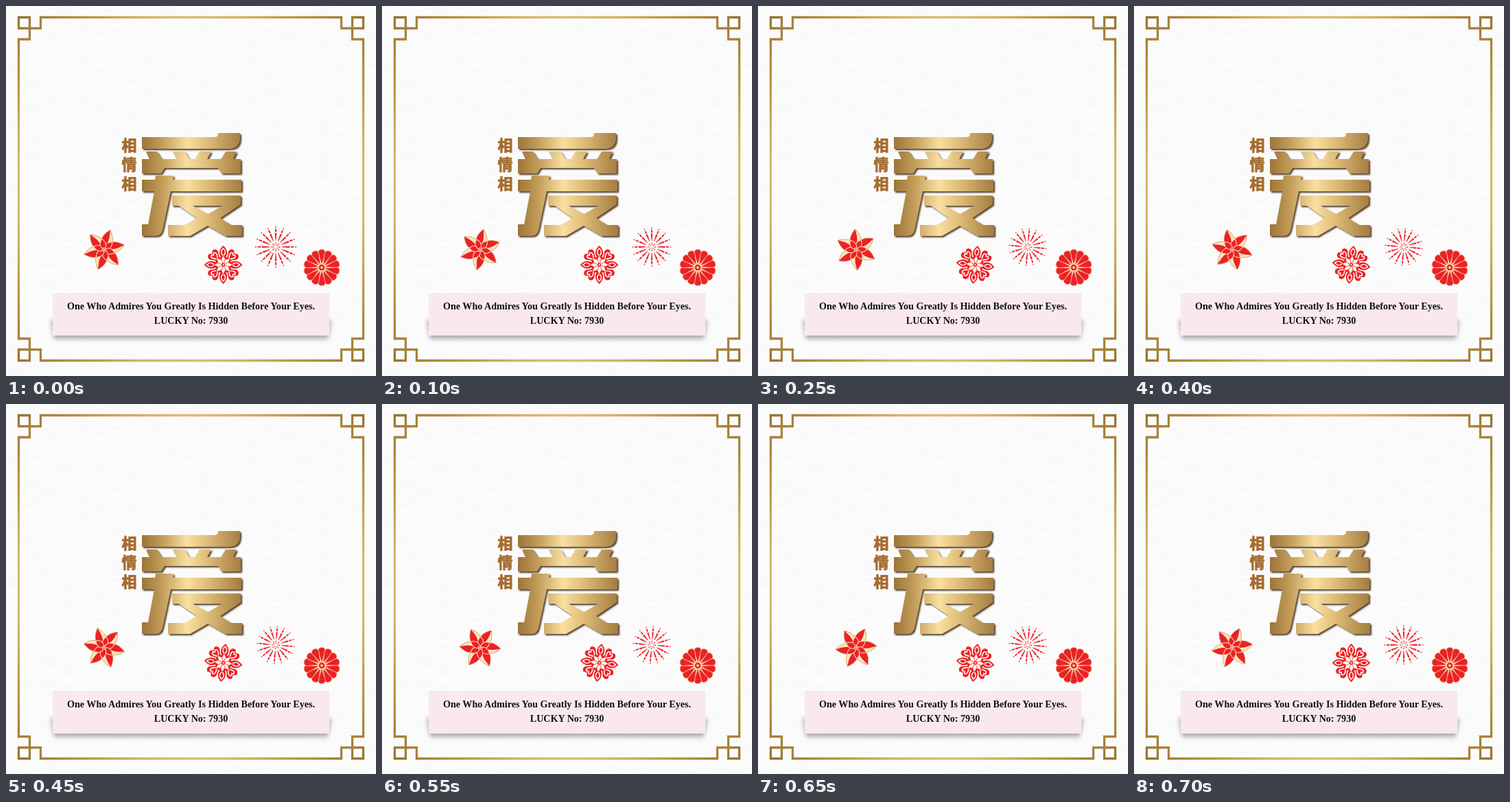
Animation of 539x539 px, one loop 750 ms. Source, as an HTML page:

```html
<!DOCTYPE html>
<html lang="en">
<head>
<meta charset="utf-8">
<style>
html, body { margin: 0; width: 100%; height: 100%; overflow: hidden; background: #fbfbfb; }
svg { display: block; width: 100vw; height: 100vh; }
.message { font: bold 14.1px "Liberation Serif", "Times New Roman", serif; text-anchor: middle; fill: #111; }
.side { font: 900 22px "Noto Sans CJK SC", "Noto Sans CJK", sans-serif; text-anchor: middle;
  fill: #a56d32; stroke: #a56d32; stroke-width: .8; stroke-linejoin: round; }
</style>
</head>
<body>
<svg viewBox="0 0 539 539">
  <defs>
    <linearGradient id="gold" gradientUnits="userSpaceOnUse" x1="198" x2="344">
      <stop offset="0" stop-color="#9d753a"/>
      <stop offset=".2" stop-color="#c29c58"/>
      <stop offset=".45" stop-color="#f9dfa0"/>
      <stop offset=".65" stop-color="#dfbd78"/>
      <stop offset="1" stop-color="#a27b40"/>
    </linearGradient>
    <radialGradient id="trim" gradientUnits="userSpaceOnUse" cx="269.5" cy="266.5" r="356">
      <stop offset=".7" stop-color="#dcbb70"/>
      <stop offset=".8" stop-color="#c09a4c"/>
      <stop offset="1" stop-color="#98722e"/>
    </radialGradient>
    <filter id="paper" x="0" y="0" width="1" height="1">
      <feTurbulence type="fractalNoise" baseFrequency=".04 .2" numOctaves="3" seed="4"/>
      <feColorMatrix values="0 0 0 0 .86  0 0 0 0 .86  0 0 0 0 .87  .5 0 0 0 -.15"/>
    </filter>
    <filter id="soft" x="-.1" y="-.5" width="1.2" height="2"><feGaussianBlur stdDeviation="3"/></filter>
    <filter id="lift" x="-.1" y="-.1" width="1.2" height="1.2">
      <feDropShadow dx="2" dy="2" stdDeviation=".8" flood-color="#46301a" flood-opacity=".95"/>
    </filter>
  </defs>

  <rect width="539" height="539" fill="#fcfcfc"/>
  <rect width="539" height="539" filter="url(#paper)"/>
  <path id="frame" fill="none" stroke="url(#trim)" stroke-width="3.3"/>

  <g class="side">
    <text x="179.5" y="211">相</text>
    <text x="179.5" y="239">情</text>
    <text x="179.5" y="267">相</text>
  </g>

  <g fill="url(#gold)" fill-rule="evenodd" filter="url(#lift)">
    <path d="M198 191H304Q309 191 309 185H341V192Q341 208 325 208H198Z"/>
    <path d="M198 223H209L204 212H220L227 223H249L243 212H260L267 223H275L282 212H299L293 223H313L320 212H336L331 223H342V244H314L309 236H231L226 244H198Z"/>
    <path d="M198 253H217L218 247H244L243 253H343V270H240L228 326Q226 335 217 335H198V318H207L216 270H198Z"/>
    <path d="M242 276H342V289L312 309L328 319H344V335H320L294 320L268 335H236V319H260L278 309L252 291H242ZM272 291L294 303L315 291Z"/>
  </g>

  <g id="flowers"></g>

  <path d="M65 458L70 485H469L474 458Z" fill="#777" opacity=".6" filter="url(#soft)"/>
  <rect x="68" y="418" width="403" height="62" fill="#f9e8f0"/>
  <g class="message">
    <text x="269.5" y="442">One Who Admires You Greatly Is Hidden Before Your Eyes.</text>
    <text x="269.5" y="463">LUCKY No: 7930</text>
  </g>
</svg>
<script>
const RED = '#eb2128', CREAM = '#f8e4b8', GOLD = '#d0a062', WHITE = '#fff6ec';
const LOOP = 750;
const STEPS = [0, 100, 150, 250, 400, 450, 550, 600, 650, 700];

// Knotted corners, each joined to its neighbours by the straight border
const corner = (x, y, sx, sy) => {
  const p = (dx, dy) => `${x + dx * sx} ${y + dy * sy}`;
  return `M${[p(252, 0), p(32, 0), p(32, 16), p(0, 16), p(0, 0), p(16, 0), p(16, 32), p(0, 32), p(0, 251)].join('L')}`;
};
document.getElementById('frame').setAttribute('d',
  corner(18.5, 16.5, 1, 1) + corner(520.5, 16.5, -1, 1) +
  corner(18.5, 516.5, 1, -1) + corner(520.5, 516.5, -1, -1));

const ring = (count, shape, start = 0) => Array.from({ length: count }, (_, i) =>
  `<g transform="rotate(${start + i * 360 / count})">${shape}</g>`).join('');
const path = (d, fill, stroke = 'none', width = 1) =>
  `<path d="${d}" fill="${fill}" stroke="${stroke}" stroke-width="${width}"/>`;
const dot = (r, fill, y = 0) => `<circle cy="${y}" r="${r}" fill="${fill}"/>`;

const poinsettia =
  ring(6, path('M0 0C-12 -10 -9 -20 0 -30C9 -20 12 -10 0 0Z', RED, GOLD, .8) +
    path('M0 -5C11 -11 9 -20 0 -29C3 -20 3 -12 0 -5Z', CREAM)) +
  ring(6, path('M0 0C-6 -5 -5 -11 0 -16C5 -11 6 -5 0 0Z', RED, CREAM, 1), 30) +
  dot(3.2, CREAM) + ring(5, dot(.8, RED, -1.9));

const lace =
  ring(4, path('M0 -8C-9 -16 -12 -24 -4 -26L0 -23L4 -26C12 -24 9 -16 0 -8Z', RED) +
    path('M0 -12C-5 -17 -6 -21 -2 -22L0 -20L2 -22C6 -21 5 -17 0 -12Z', 'none', WHITE, 1.6), 45) +
  ring(4, path('M0 -6C-9 -13 -8 -22 0 -29C8 -22 9 -13 0 -6Z', RED, WHITE, 1.6) +
    path('M0 -13C-4 -17 -4 -20 0 -24C4 -20 4 -17 0 -13Z', 'none', WHITE, 1.6)) +
  dot(12, RED) +
  ring(8, path('M0 0L-3.5 -7L0 -14L3.5 -7Z', WHITE, RED, .7)) +
  dot(2.6, RED) + dot(1.2, CREAM);

const burst =
  ring(16, path('M-.4 -9L-1.3 -20H1.3L.4 -9Z', RED) + path('M-1.1 -21.5H1.1L.8 -26H-.8Z', RED) + dot(.9, RED, -28.5)) +
  ring(8, dot(.9, RED, -5.5)) + ring(8, dot(.7, RED, -3.2), 22.5);

const daisy =
  ring(14, path('M0 -4L-5.5 -22Q-4.5 -26.5 0 -26.5Q4.5 -26.5 5.5 -22Z', RED, '#efc08c', .9)) +
  `<circle r="5" fill="${RED}" stroke="${CREAM}" stroke-width="1.2"/>` + dot(1.8, CREAM);

const spots = [[143, 355, poinsettia], [316.5, 377, lace], [393, 351, burst], [460, 381, daisy]];
const flowers = document.getElementById('flowers');
flowers.innerHTML = spots.map(([x, y, art]) => `<g transform="translate(${x} ${y})"><g>${art}</g></g>`).join('');
const [spinner, swayer, pulser] = [...flowers.children].map(g => g.firstChild);

function draw(now) {
  const time = now % LOOP;
  const held = STEPS.filter(s => s <= time).pop();
  const resting = held < 250 || held >= 700;
  const size = held === 0 ? 1.02 : resting ? .97 : .94;
  spinner.setAttribute('transform', `rotate(${17 - held * 60 / LOOP})`);
  swayer.setAttribute('transform', `rotate(${resting ? 0 : 7})`);
  pulser.setAttribute('transform', `scale(${size}) rotate(${resting ? 0 : 5})`);
  requestAnimationFrame(() => draw(performance.now()));
}
draw(performance.now());
</script>
</body>
</html>
```
